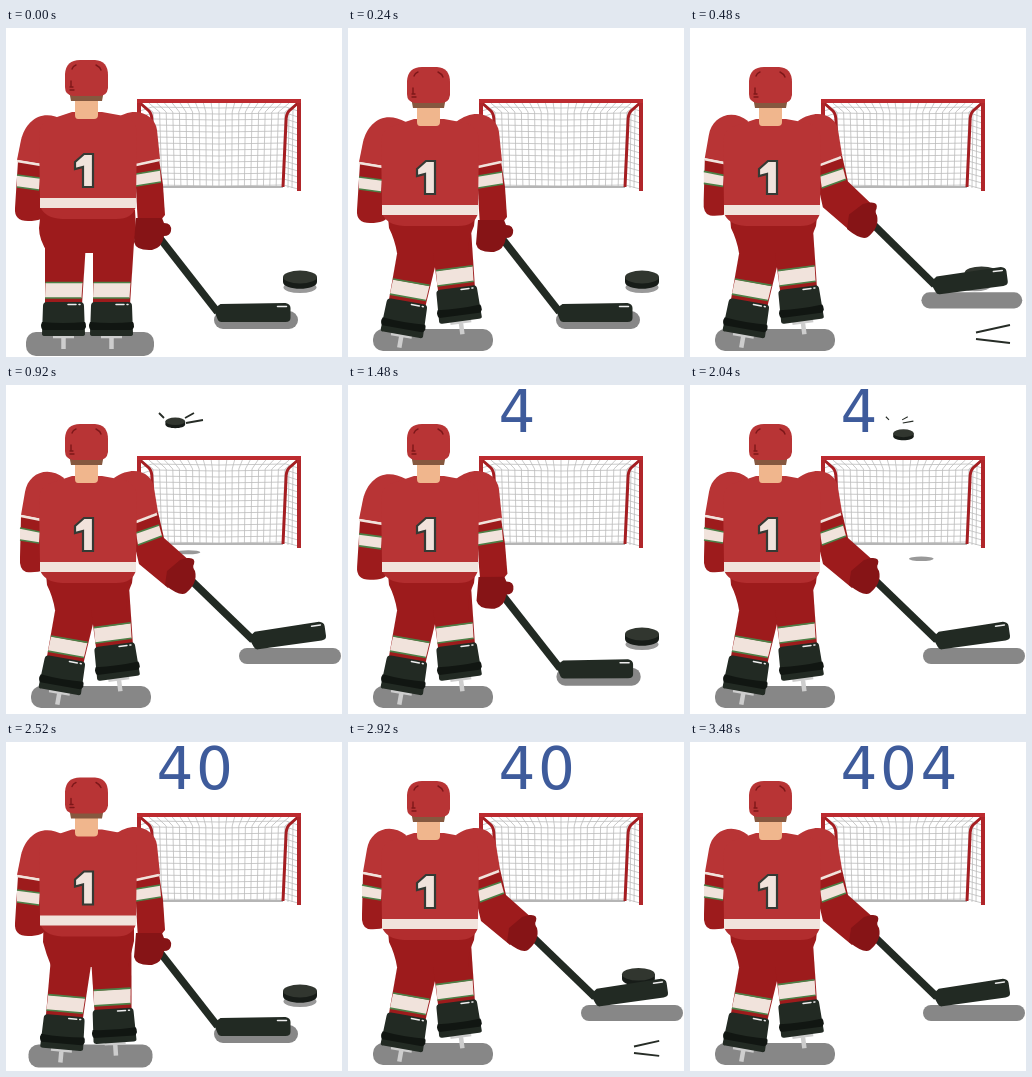
These frames come from a looping animation (336x329 px, 3640 ms). An HTML page:

```html
<!DOCTYPE html>
<html lang="en">
<head>
<meta charset="utf-8">
<title>404 hockey</title>
<style>
  html, body { margin: 0; width: 100%; height: 100%; overflow: hidden; background: #fff; }
  svg { display: block; width: 336px; height: 329px; }
  .light { fill: #b83435; }
  .dark { fill: #9d1b1c; }
  .glove { fill: #861416; }
  .white { fill: #f1e3dc; }
  .ink { fill: #222a23; }
  .sole { fill: #111612; }
  .ground { fill: #878787; }
  .line { fill: none; stroke: #f1e3dc; stroke-width: 2.6; }
  .green { fill: none; stroke: #4c8047; stroke-width: 1.7; }
  .shine { fill: none; stroke: #eee; stroke-width: 1.5; stroke-linecap: round; }
  .mark { fill: none; stroke: #7d1719; stroke-width: 1.4; stroke-linecap: round; }
  .speed { fill: none; stroke: #262c26; stroke-width: 1.8; }
  .digit { font: 400 58px "DejaVu Sans", Verdana, sans-serif; fill: #3e5b9b; text-anchor: middle; }
</style>
</head>
<body>
<svg viewBox="0 0 336 329">
  <g fill="none">
    <path id="mesh" stroke="#bcbcbc" stroke-width=".8"/>
    <path d="M149 159H277" stroke="#b5b5b5" stroke-width="2"/>
    <path d="M134 75L143 83Q146 86 146 94L149 159M292 75L283 83Q280 86 280 94L277 159" stroke="#a51e22" stroke-width="3"/>
    <path d="M133 72V163M293 72V163" stroke="#b0262a" stroke-width="4"/>
    <path d="M131 73H295" stroke="#bd2b30" stroke-width="4"/>
  </g>

  <text class="digit" y="47">4</text>
  <text class="digit" y="47">0</text>
  <text class="digit" y="47">4</text>

  <rect id="stickShade" class="ground"/>
  <ellipse id="puckShade" fill="#999"/>
  <g id="puck">
    <path d="M-17 -2V3C-17 12 17 12 17 3V-2Z" fill="#171c18"/>
    <ellipse cy="-2" rx="17" ry="6.500" fill="#31362f"/>
  </g>
  <g id="burst" class="speed">
    <path d="M9 -5L18 -10M10 0L27 -3M-12 -5L-17 -10"/>
  </g>
  <path id="trail" class="speed"/>

  <rect id="feetShade" class="ground"/>

  <defs>
    <g id="leg">
      <path d="M47 308H68M57.500 308V321" fill="none" stroke="#cdcdcd" stroke-width="4.500"/>
      <path class="dark" d="M39 214H80L76 277H39Z"/>
      <path class="white" d="M39.500 255H76.500L75.500 270H39Z"/>
      <path class="green" d="M39.500 254.500H76.500M39 270H75.500"/>
      <path class="ink" d="M37 278Q37 274 41 274H74Q78 274 78 278L79 306Q79 308 76 308H39Q36 308 36 306Z"/>
      <path class="sole" d="M36 294Q57 296 79 294Q80 295 80 299Q79 302 77 302H37Q35 301 35 297Z"/>
      <path class="shine" d="M62 276.500H70M73 276.500H74"/>
    </g>
  </defs>
  <g id="legL"><use href="#leg"/></g>
  <g id="legR"><use href="#leg" x="48"/></g>
  <path class="dark" data-k="body" d="M35 182H129L130 200Q130 210 127 217L124 225H42Q33 212 33 200Z"
    data-b="M40 189H127L126 198Q122 206 121 214L120 225H49Q47 212 41 200Z"/>

  <g id="armL">
    <path class="dark" d="M12 133L36 137L36 170L40 186Q38 193 22 193Q8 193 9 180Z"
      data-b="M15 129L36 133L36 163L39 183Q30 186 20 185Q13 183 14 170Z"/>
    <path class="light" d="M58 92C36 80 20 92 15 112L11 132L36 136L50 120Z"
      data-b="M58 91C42 78 22 86 19 105L15 128L36 132L50 118Z"/>
    <path class="line" d="M11 133L35 137" data-b="M15 129L35 133"/>
    <path class="white" d="M11 147L34 150L33 162L11 159Z" data-b="M14 141L34 145L33 156L14 153Z"/>
    <path class="green" d="M11 147L34 150M11 159L33 162" data-b="M14 141L34 145M14 153L33 156"/>
  </g>

  <g id="stick">
    <path d="M-57 -74L0 -1" fill="none" stroke="#222a23" stroke-width="7.500"/>
    <path class="ink" d="M-4 -4L3 -9L68 -10Q73 -9 73 -5V5Q73 9 68 9H4Q1 9 0 6Z"/>
    <path class="shine" d="M60 -6.500H69"/>
  </g>

  <g id="armR">
    <path class="dark" d="M130 136L153 131L157 157L159 187L150 198L132 196L131 180L130 160Z"
      data-b="M130 133L152 125L158 151L185 175L174 188L162 201L133 177L129 160Z"/>
    <path class="light" d="M108 92C128 76 149 86 151 102L154 131L130 136L118 120Z"
      data-b="M108 91C130 76 147 88 148 101L152 125L130 134L118 118Z"/>
    <path class="line" d="M130 137L153 132" data-b="M130 135L151 127"/>
    <path class="white" d="M130 146L154 142L155 154L130 158Z" data-b="M130 146L153 138L156 149L132 158Z"/>
    <path class="green" d="M130 146L154 142M130 158L155 154" data-b="M130 146L153 138M132 158L156 149"/>
    <path class="glove" d="M130 190L156 190L158 195Q166 195 165 203Q164 208 158 208Q156 220 146 222Q130 223 128 214Z"
      data-b="M161 184L174 173L181 171Q190 170 188 177Q186 180 189 184Q192 196 180 206Q174 210 159 198Z"/>
  </g>

  <g id="torso">
    <path fill="#b22d2e" d="M34 178H130Q127 191 110 191H56Q38 190 34 178Z"/>
    <path class="light" d="M33 106Q34 93 48 90L66 84H96L118 88Q131 92 131 106L130 172H34Z"/>
    <path class="white" d="M34 170H130V180H34Z"/>
    <path d="M69 70H92V87Q92 91 88 91H72Q69 91 69 87Z" fill="#f0b68d"/>
    <path d="M63 62H98L96 73H65Z" fill="#85583f"/>
    <path class="light" d="M59 46Q60 32 74 32H89Q102 33 102 47V60Q101 68 93 68H67Q59 67 59 59Z"/>
    <path class="mark" d="M66 41Q67 38 70 37M90 37Q94 39 95 42M65 53V58M64 59H67M64 62H68"/>
    <path d="M69 134L78 126H87V159H77V139L69 141Z" class="white" stroke="#343a34" stroke-width="2.200"/>
  </g>
</svg>
<script>
const $ = id => document.getElementById(id);
const LOOP = 3640, SHOT = 1200, STEP = 40;
const lerp = (a, b, p) => a + (b - a) * p;
const ramp = (t, a, b) => Math.min(1, Math.max(0, (t - a) / (b - a)));
const smooth = u => u * u * (3 - 2 * u);
const set = (el, attrs) => { for (const k in attrs) el.setAttribute(k, attrs[k]); };

// Blend two paths that share the same commands
function blend(a, b, p) {
  const to = b.match(/-?[\d.]+/g);
  let i = 0;
  return a.replace(/-?[\d.]+/g, n => lerp(+n, +to[i++], p).toFixed(2));
}

// Cubic timing curve (.33, 0, .5, 1)
function flight(u) {
  let lo = 0, hi = 1, s = u;
  for (let i = 0; i < 24; i++) {
    s = (lo + hi) / 2;
    const x = (1 - s) ** 2 * s + 1.5 * (1 - s) * s * s + s ** 3;
    if (x < u) lo = s; else hi = s;
  }
  return smooth(s);
}

const morphs = [...document.querySelectorAll('[data-b]')].map(el => ({
  el, a: el.getAttribute('d'), b: el.dataset.b, k: el.dataset.k || 'swing'
}));
const digits = [...document.querySelectorAll('.digit')];
const goals = [169, 208.5, 249];

// Net: strands run back from the bar, then down
let mesh = '';
for (let i = 0; i <= 20; i++) {
  mesh += `M${135 + i * 7.8} 75L${147 + i * 6.6} 84L${149.5 + i * 6.35} 158`;
}
for (let j = 0; j < 14; j++) {
  const y = 79 + j * 6, inset = 13 + j * 0.2;
  mesh += `M134 ${y + 4}L${133 + inset} ${y}Q213 ${y + 2} ${293 - inset} ${y}L292 ${y + 4}`;
}
for (const x of [283, 287]) mesh += `M${x} 80L${x - 1} 160`;
set($('mesh'), { d: mesh });

function box(el, a, b, p) {
  const [x, y, width, height] = a.map((v, i) => lerp(v, b[i], p));
  set(el, { x, y, width, height, rx: Math.min(height / 2, 10) });
}

function drawPlayer(t) {
  const body = smooth(ramp(t, 0, 240)), swing = smooth(ramp(t, 260, 520));
  const pose = { body, swing };
  for (const m of morphs) set(m.el, { d: blend(m.a, m.b, pose[m.k]) });
  set($('torso'), { transform: `translate(0 ${7 * body})` });
  for (const id of ['armL', 'armR']) set($(id), { transform: `translate(0 ${2 * body})` });
  set($('legL'), { transform: `translate(${-body} ${-body}) rotate(${10 * body} 57 291)` });
  set($('legR'), { transform: `translate(${5 * body} ${-14.5 * body}) rotate(${-7.5 * body} 105 291)` });
  set($('stick'), { transform:
    `translate(${lerp(211.5, 247, swing)} ${lerp(285, 256, swing)}) rotate(${-8 * swing})` });
  box($('stickShade'), [208, 283, 84, 18], [233, 263, 102, 16], swing);
  box($('feetShade'), [20, 304, 128, 24], [25, 301, 120, 22], body);
}

function drawPuck(t, goal) {
  const p = flight(ramp(t, 440, 940)), gone = ramp(t, 940, 1000);
  set($('puck'), { transform:
    `translate(${lerp(294, goal, p)} ${lerp(251, 37, p)}) scale(${lerp(1, .58, p) * (1 - gone)})` });
  const u = ramp(t, 440, 960), drop = flight(u);
  set($('puckShade'), {
    cx: lerp(294, goal + 4, u), cy: lerp(259.5, 166.5, drop),
    rx: lerp(16.5, 12, drop), ry: lerp(5.5, 2, drop), opacity: 1 - gone
  });
  const s = ramp(t, 740, 900);
  set($('burst'), {
    transform: `translate(${goal + lerp(-7, 1, s)} 38) scale(${s})`,
    opacity: 1 - ramp(t, 940, 1040)
  });
  const end = smooth(ramp(t, 270, 470)) * (1 - ramp(t, 480, 600) ** .6 * .5) * (t < 600);
  const x = lerp(286, 320, end);
  set($('trail'), {
    d: `M286 304.500L${x} ${lerp(304.5, 297, end)}M286 311L${x} ${lerp(311, 315, end)}`,
    opacity: end > 0.01 ? 1 : 0
  });
}

function draw(time) {
  const t = Math.floor(time % LOOP / STEP) * STEP;
  const shot = Math.min(2, Math.floor(t / SHOT)), local = t - shot * SHOT;
  drawPlayer(local);
  drawPuck(local, goals[shot]);
  digits.forEach((el, i) => {
    const p = i < shot ? 1 : i > shot ? 0 : smooth(ramp(local, 930, 1080));
    set(el, {
      opacity: p,
      transform: `translate(${goals[i]} ${26 * (1 - p)}) scale(${p})`
    });
  });
}

const start = performance.now();
function tick() {
  draw(performance.now() - start);
  requestAnimationFrame(tick);
}
tick();
</script>
</body>
</html>
```
